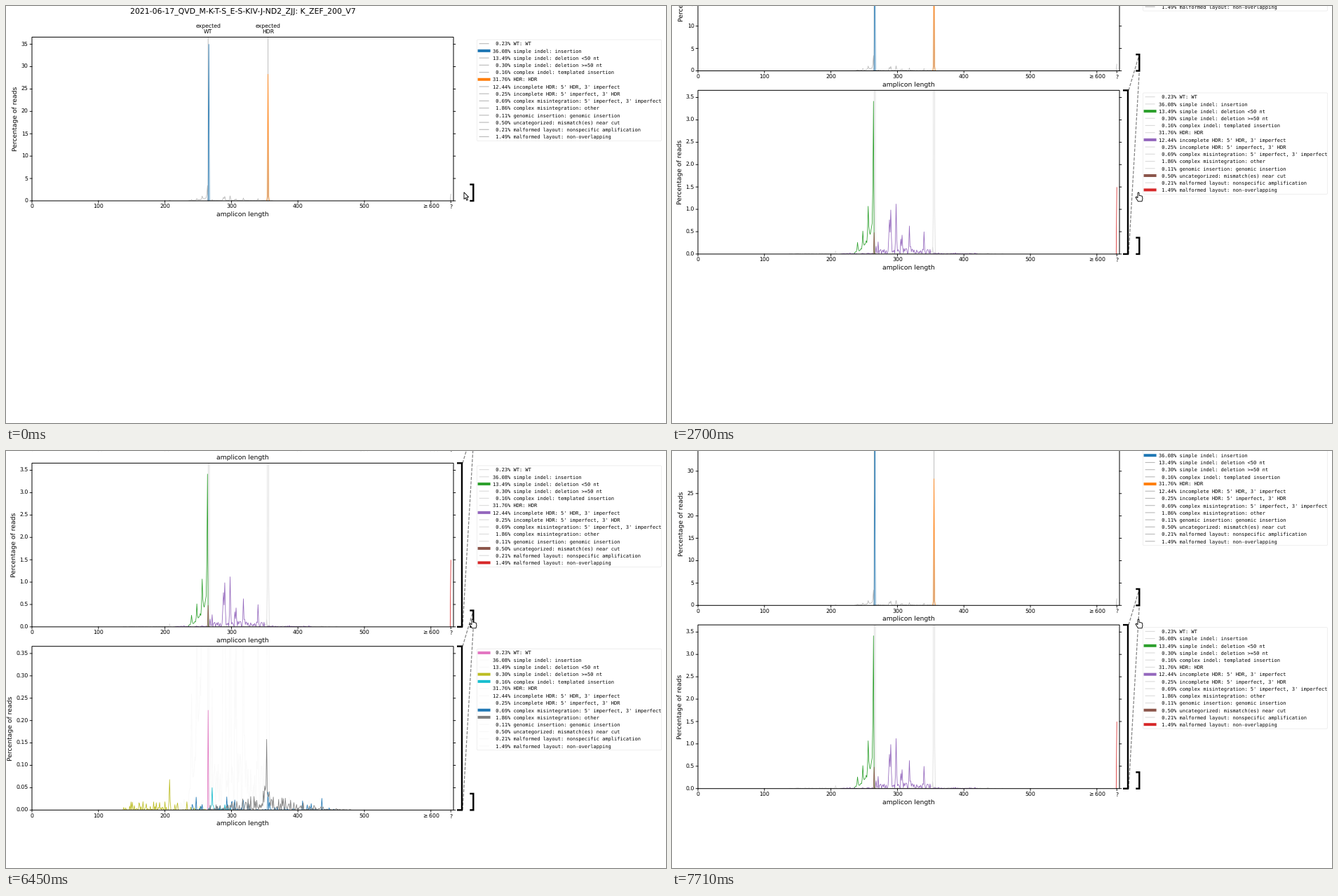
A matplotlib script for the animation above (8000 ms loop, 941 px wide and 595 px high).

```python
import matplotlib.pyplot as plt
import numpy as np
from matplotlib.animation import FuncAnimation
from matplotlib.patches import FancyBboxPatch, Polygon, Rectangle

WIDTH, HEIGHT = 941, 595
STEP, LOOP = 80, 8000
PX = 0.72  # points per pixel at 100 dpi

LEFT, RIGHT = 37, 638
TOP, PLOT_H, PITCH = 44.4, 233.6, 261.4
Y_MAX = 36.6
UNIT = 0.777  # pixels per typographic point on the page
TICK, LABEL, TITLE, MONO = 10 * UNIT, 12 * UNIT, 14 * UNIT, 9 * UNIT
GREYS = ["0.72", "0.86", "0.975"]

plt.rcParams["text.hinting"] = "none"
plt.rcParams["path.snap"] = False
plt.rcParams["font.family"] = "DejaVu Sans"
rng = np.random.default_rng(4)

fig = plt.figure(figsize=(9.41, 5.95), dpi=100, facecolor="white")
ax = fig.add_axes([0, 0, 1, 1])
ax.axis("off")
ax.set_xlim(0, WIDTH)
ax.set_ylim(HEIGHT, 0)

LENGTHS = np.arange(631)
CUT, INSERTED = 265, 355


def peak(pos, height, foot=0.0):
    """One spike whose two neighbours reach a fraction of its height."""
    distance = abs(LENGTHS - pos)
    return height * np.where(distance == 0, 1, foot * (distance == 1))


def band(lo, hi, level, power):
    """Random noise; a higher power leaves fewer, sharper spikes."""
    inside = (LENGTHS >= lo) & (LENGTHS < hi)
    return inside * level * rng.random(631) ** power


def short_deletions():
    # Decay away from the cut, with a spike every eight bases
    d = CUT - 1 - LENGTHS
    decay = 0.9 * np.exp(-abs(d) / 9) * (0.85 + 0.3 * rng.random(631))
    spikes = sum(peak(CUT - 1 - 8 * i, 2.45 / (i + 1) ** 1.8, 0.25)
                 for i in range(4))
    return (decay + spikes) * (d >= 0) * (d < 29)


def imperfect_inserts():
    tall = {288: .45, 290: .76, 298: 1.05, 307: .37, 318: .5, 340: .33}
    spikes = sum(peak(pos, height, 0.2) for pos, height in tall.items())
    return (spikes + band(267, 350, 0.11, 1.2) + band(267, 350, 0.3, 10)
            + band(215, 264, 0.03, 4) + band(350, 420, 0.04, 4))


def other_misintegrations():
    bell = 0.035 * np.exp(-((LENGTHS - 345) / 75) ** 2)
    rise = 0.05 * np.exp(-abs(LENGTHS - INSERTED + 2) / 3.5)
    hump = bell * rng.random(631) ** 2.8 + rise + peak(INSERTED - 2, 0.108)
    return hump * (LENGTHS > CUT) * (LENGTHS < 482)


def trace():
    return band(180, 450, 0.004, 5)


# share, label, panel where it is highlighted, colour, data
ROWS = [
    (0.23, "WT: WT", 2, "tab:pink", peak(CUT, 0.223)),
    (36.08, "simple indel: insertion", 0, "tab:blue", peak(CUT + 1, 35)),
    (13.49, "simple indel: deletion <50 nt", 1, "tab:green",
     short_deletions()),
    (0.30, "simple indel: deletion >=50 nt", 2, "tab:olive",
     peak(207, 0.068, 0.2) + band(138, 262, 0.02, 6)),
    (0.16, "complex indel: templated insertion", 2, "tab:cyan",
     peak(271, 0.045, 0.25) + band(CUT, 300, 0.016, 5)),
    (31.76, "HDR: HDR", 0, "tab:orange", peak(INSERTED, 28.3, 0.04)),
    (12.44, "incomplete HDR: 5' HDR, 3' imperfect", 1, "tab:purple",
     imperfect_inserts()),
    (0.25, "incomplete HDR: 5' imperfect, 3' HDR", None, None, trace()),
    (0.69, "complex misintegration: 5' imperfect, 3' imperfect", 2, "tab:blue",
     peak(INSERTED, 0.04) + band(240, 455, 0.03, 9)),
    (1.86, "complex misintegration: other", 2, "tab:gray",
     other_misintegrations()),
    (0.11, "genomic insertion: genomic insertion", None, None, trace()),
    (0.50, "uncategorized: mismatch(es) near cut", 1, "tab:brown",
     peak(CUT, 0.48, 0.03)),
    (0.21, "malformed layout: nonspecific amplification", None, None, trace()),
    (1.49, "malformed layout: non-overlapping", 1, "tab:red", peak(630, 1.49)),
]


def px(length):
    return LEFT + 0.948 * length


def text(x, y, s, size, **kw):
    return ax.text(x, y, s, fontsize=size * PX, va="baseline", **kw)


def line(x, y, color, width, **kw):
    return ax.plot(x, y, color=color, lw=width * PX, **kw)[0]


def bracket(x0, x1, y0, y1):
    line([x0, x1, x1, x0], [y0, y0, y1, y1], "black", 2.4, zorder=5,
         solid_joinstyle="miter", solid_capstyle="butt")


def draw_axes(k, top, bottom):
    frame = Rectangle((LEFT, bottom), RIGHT - LEFT, -PLOT_H, fill=False,
                      ec="black", lw=PX, zorder=4)
    ax.add_patch(frame)
    names = [(v, str(v)) for v in range(0, 501, 100)]
    for v, name in names + [(600, r"$\geq$600"), (630, "?")]:
        line([px(v)] * 2, [bottom, bottom + 2.8], "black", 0.9)
        text(px(v), bottom + 11.2, name, TICK, ha="center")
    for i in range(8):
        y = bottom - PLOT_H * i * 5 / Y_MAX
        line([LEFT - 2.8, LEFT], [y, y], "black", 0.9)
        line([RIGHT, RIGHT + 2.8], [y, y], "black", 0.9)
        text(31.6, y + 2.8, f"{i * 5 / 10 ** k:.{k}f}", TICK, ha="right")
    text((LEFT + RIGHT) / 2, bottom + 22.3, "amplicon length", LABEL,
         ha="center")
    digits = 0.636 * max(2, k + 1) + 0.318 * (k > 0)
    text(26.3 - digits * TICK, (top + bottom) / 2, "Percentage of reads",
         LABEL, ha="center", rotation=90, rotation_mode="anchor")
    return frame


def draw_series(k, bottom, frame):
    scale = PLOT_H / Y_MAX * 10 ** k
    for *_, home, color, data in ROWS:
        lit = home == k
        height = data * scale
        near = height + np.roll(height, 1) + np.roll(height, -1)
        y = np.where(near > 0.3, bottom - height, np.nan)
        curve = line(px(LENGTHS), y, color if lit else GREYS[k], 0.8,
                     zorder=3 if lit else 2)
        curve.set_clip_path(frame)


def draw_legend(k, top):
    box = FancyBboxPatch((673, top + 5.1), 260, 141.5,
                         boxstyle="round,pad=1.5,rounding_size=1.5",
                         fc="white", ec="0.92", lw=0.8 * PX)
    ax.add_patch(box)
    for i, (share, name, home, color, _) in enumerate(ROWS):
        y = top + 9.3 + 10.215 * i
        lit = home == k
        line([674.6, 688.6], [y, y], color if lit else GREYS[k],
             4 if lit else 1.1, solid_capstyle="projecting" if lit else "butt")
        text(694, y + 2.3, f"{share:5.2f}% {name}", MONO,
             family="DejaVu Sans Mono")


def draw_panel(k):
    before = set(ax.get_children())
    top = TOP + PITCH * k
    bottom = top + PLOT_H
    frame = draw_axes(k, top, bottom)
    draw_series(k, bottom, frame)
    draw_legend(k, top)
    small_top = bottom - PLOT_H / 10
    bracket(661.3, 666.3, small_top, bottom)
    if k == 0:
        text((LEFT + RIGHT) / 2, 10.9,
             "2021-06-17_QVD_M-K-T-S_E-S-KIV-J-ND2_ZJJ: K_ZEF_200_V7",
             TITLE, ha="center")
        for length, name in ((CUT, "WT"), (INSERTED, "HDR")):
            line([px(length)] * 2, [top, bottom], "0.75", 1, zorder=1)
            text(px(length), 30.2, "expected", TICK, ha="center")
            text(px(length), 39.3, name, TICK, ha="center")
    else:
        bracket(643, 650, top, bottom)
        for start, end in ((top, small_top - PITCH), (bottom, bottom - PITCH)):
            line([651, 666.3], [start, end], "0.5", 1.2, ls="--", zorder=4)
    return [a for a in ax.get_children() if a not in before]


panels = [draw_panel(k) for k in range(3)]

ARROW = np.array([(0, 0), (0, 9.8), (2.2, 7.8), (3.8, 11.5), (5.4, 10.8),
                  (3.8, 7.2), (6.7, 7)])
HAND = np.array([(-1, 8), (-1, 1), (0, 0), (1, 1), (1, 4.5), (5.2, 5.4),
                 (6, 9), (5, 13), (-.5, 13), (-4, 7.3), (-3, 6.3)])
cursor = Polygon(ARROW, fc="white", ec="black", lw=0.9 * PX, zorder=9)
ax.add_patch(cursor)


def glide(t, start, end, power=1.0):
    """Progress from 0 to 1; a power above 1 slows towards the end."""
    p = np.clip((t - start) / (end - start), 0, 1)
    return 1 - (1 - p) ** power


def scroll(t):
    return (231 * glide(t, 2000, 2880, 1.25) + 57.5 * glide(t, 3280, 3600, 3)
            - 230.8 * glide(t, 7150, 7680))


def pointer(t):
    back = glide(t, 3600, 4080)
    onto = glide(t, 4240, 4400)
    x = 653 + 12 * glide(t, 320, 960) - 4.5 * back + 4.5 * onto
    y = 265.8 - 25 * back - onto
    return x, y


def update(i):
    t = i * STEP
    offset = scroll(t)
    ax.set_ylim(HEIGHT + offset, offset)
    shown = [True, t >= 1310, 4890 <= t < 6610]
    for artists, visible in zip(panels, shown):
        for artist in artists:
            artist.set_visible(visible)
    x, y = pointer(t)
    over_bracket = 740 <= t < 3170 or t >= 4310
    cursor.set_xy((HAND if over_bracket else ARROW) + [x, y + offset])
    return []


anim = FuncAnimation(fig, update, frames=LOOP // STEP, interval=STEP,
                     init_func=lambda: update(0), repeat=True, repeat_delay=0,
                     blit=False)
plt.show()
```
